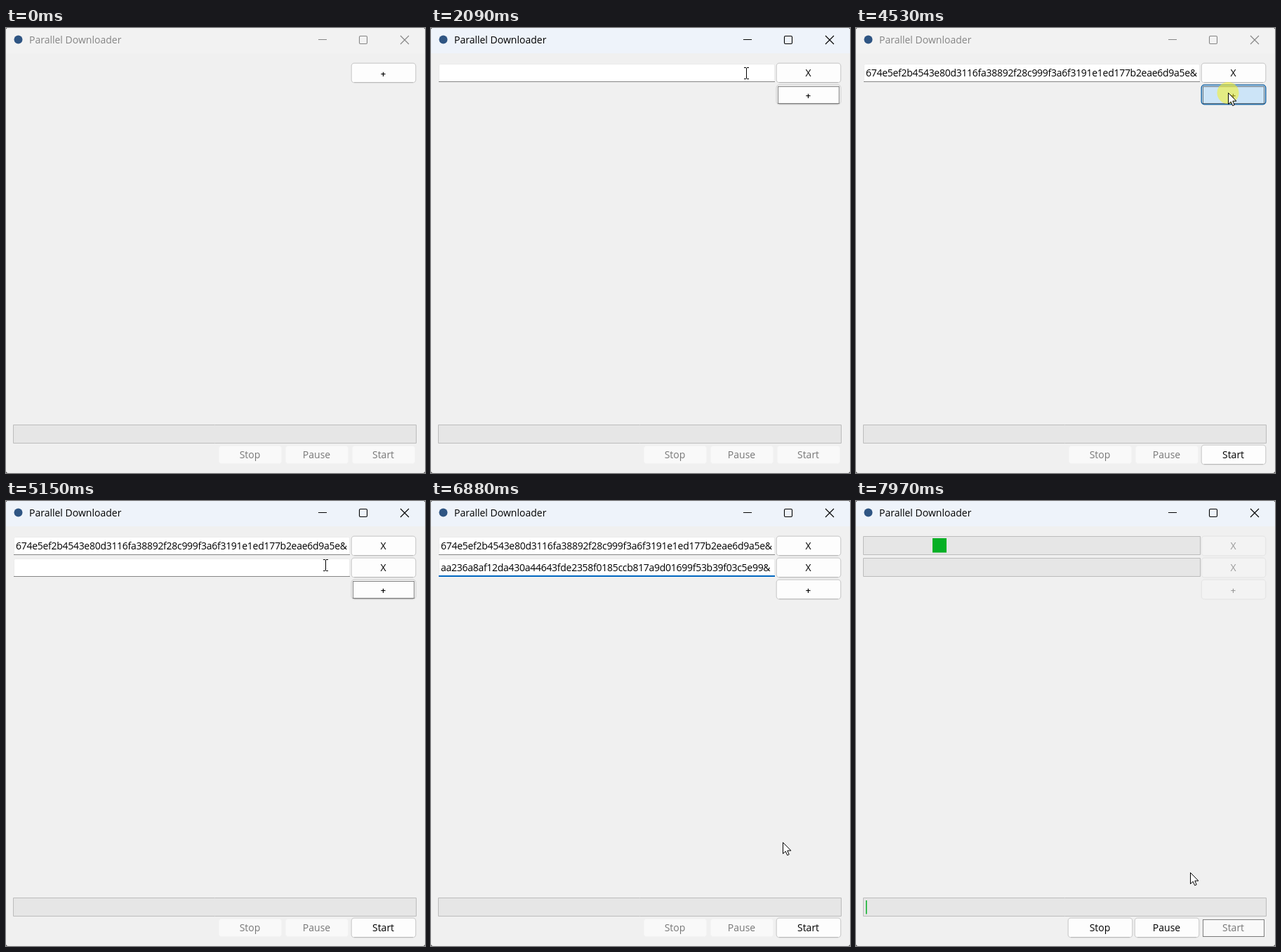
Recreate the animation shown at these times as an HTML page with a canvas. Size 597 by 634 pixels, loop 7990 ms.

```html
<!DOCTYPE html>
<html lang="en">
<head>
<meta charset="utf-8">
<title>Parallel Downloader</title>
<style>
  html, body { margin: 0; width: 100%; height: 100%; overflow: hidden; background: #f0f0f0; }
  canvas { display: block; }
</style>
</head>
<body>
<canvas id="stage" width="597" height="634"></canvas>
<script>
const ctx = document.getElementById('stage').getContext('2d');
const LOOP = 7990;
const FONT = '"Open Sans", "Noto Sans", sans-serif';
const URLS = [
  { text: '674e5ef2b4543e80d3116fa38892f28c999f3a6f3191e1ed177b2eae6d9a5e&', pasted: 2890 },
  { text: 'aa236a8af12da430a44643fde2358f0185ccb817a9d01699f53b39f03c5e99&', pasted: 5880 },
];
const PRESSES = [[1400, 1530], [2210, 2420], [4530, 4660], [5400, 5500], [7430, 7570]];
// Pointer waypoints: time, x, y
const PATH = [
  [0, 600, 78], [570, 600, 78], [1200, 533, 66], [1600, 533, 66], [2090, 449, 64],
  [2900, 449, 64], [3260, 600, 82], [3650, 600, 82], [3680, 595, 83], [4160, 530, 92],
  [4750, 530, 92], [5270, 443, 91], [5870, 443, 91], [6080, 444, 99], [6310, 444, 99],
  [7100, 514, 576], [7300, 521, 598], [7650, 521, 598], [7910, 491, 546],
  [7970, 476, 529], [LOOP, 475, 528],
];
// Keyboard focus changes: time, widget
const FOCUS = [[0, ''], [1400, 'add'], [2210, 'entry0'], [3250, ''],
  [4530, 'add'], [5400, 'entry1'], [7430, 'start']];

const rowTop = i => 50 + 31 * i;

function pointerAt(t) {
  const i = Math.max(1, PATH.findIndex(p => p[0] > t));
  const [t0, x0, y0] = PATH[i - 1], [t1, x1, y1] = PATH[i];
  const u = (t - t0) / (t1 - t0), k = u * u * (3 - 2 * u);
  return { x: Math.round(x0 + (x1 - x0) * k), y: Math.round(y0 + (y1 - y0) * k) };
}

function stateAt(t) {
  return {
    t,
    active: (t >= 1420 && t < 3250) || t >= 4550,
    rows: t < 1560 ? 0 : t < 4690 ? 1 : 2,
    running: t >= 7600,
    focus: FOCUS.findLast(f => f[0] <= t)[1],
    press: PRESSES.find(p => t >= p[0] && t < p[1]),
    pointer: pointerAt(t),
  };
}

function rect(x, y, w, h, fill) {
  ctx.fillStyle = fill;
  ctx.fillRect(x, y, w, h);
}

function label(text, x, y, color, { align = 'left', font = '14px', spacing = 0 } = {}) {
  ctx.font = `${font} ${FONT}`;
  ctx.letterSpacing = spacing + 'px';
  ctx.textAlign = align;
  ctx.fillStyle = color;
  ctx.fillText(text, x, y);
}

function box(x, y, w, h, fill, stroke, radius = 0, lineWidth = 1) {
  ctx.beginPath();
  ctx.roundRect(x + .5, y + .5, w - 1, h - 1, radius);
  ctx.fillStyle = fill;
  ctx.fill();
  ctx.lineWidth = lineWidth;
  ctx.strokeStyle = stroke;
  ctx.stroke();
}

function line(color, width, ...segments) {
  ctx.beginPath();
  for (const [x0, y0, x1, y1] of segments) {
    ctx.moveTo(x0, y0);
    ctx.lineTo(x1, y1);
  }
  ctx.lineWidth = width;
  ctx.strokeStyle = color;
  ctx.stroke();
}

function titleBar(active) {
  const ink = active ? '#000' : '#858585';
  rect(0, 0, 597, 36, active ? '#eef3fa' : '#f2f2f2');
  ctx.beginPath();
  ctx.arc(17.5, 16.5, 6, 0, 7);
  ctx.fillStyle = '#2f5583';
  ctx.fill();
  label('Parallel Downloader', 33, 22, ink);
  line(ink, 1, [445, 16.5, 457, 16.5]);
  line(ink, 1.1, [562, 11, 574, 23], [574, 11, 562, 23]);
  ctx.beginPath();
  ctx.roundRect(503.5, 11.5, 11, 11, 1.5);
  ctx.stroke();
}

function button(s, text, x, y, { enabled = true, focused = false, faint = false } = {}) {
  const w = 92, h = 28, { x: px, y: py } = s.pointer;
  const hover = enabled && px >= x && px < x + w && py >= y && py < y + h;
  const frame = (fill, stroke) => box(x - .3, y - .3, w + .6, h + .6, fill, stroke, 4, 1.3);
  if (!enabled) {
    if (faint) frame('#f3f3f3', '#e6e6e6');
    else box(x + 1, y + 1, w - 2, h - 2, '#f9f9f9', '#f4f4f4', 3);
  } else if (hover) {
    frame(s.press ? '#cce4f7' : '#e0eef9', s.press ? '#005499' : '#0078d4');
  } else {
    frame('#fdfdfd', '#d0d0d0');
    line('#bbb', 1, [x + 4, y + h - .5, x + w - 4, y + h - .5]);
  }
  if (focused) {
    ctx.setLineDash([1, 1]);
    ctx.strokeStyle = '#000';
    ctx.lineWidth = 1;
    ctx.strokeRect(x + 2.5, y + 2.5, w - 5, h - 4);
    ctx.setLineDash([]);
  }
  const ink = enabled ? '#000' : faint ? '#9a9a9a' : '#777';
  const plus = text === '+';
  label(text, x + w / 2 - .5, y + (plus ? 20 : 19), ink,
    { align: 'center', font: plus ? '600 13px' : '14px' });
}

function entry(s, i) {
  const y = rowTop(i) + 1, focused = s.focus === 'entry' + i;
  box(11, y, 479, 26, '#fff', '#ececec', 2);
  if (focused) rect(11, y + 24, 479, 2, '#0067c0');
  else rect(11, y + 25, 479, 1, '#868686');
  if (s.t >= URLS[i].pasted) label(URLS[i].text, 14, y + 18, '#000', { spacing: -.285 });
  else if (focused) rect(14, y + 5, 1, 17, '#000');
}

function progress(y, w) {
  box(10, y, w, 27, '#e6e6e6', '#bcbcbc');
}

function pointer({ pointer: { x, y }, rows, running, press, t }) {
  if (press) {
    const fade = Math.min(1, (t - press[0] + 40) / 60, (press[1] - t) / 40);
    ctx.globalAlpha = .82 * fade;
    ctx.beginPath();
    ctx.arc(x, y + .5, 15.5, 0, 7);
    ctx.fillStyle = '#f6f32a';
    ctx.fill();
    ctx.globalAlpha = 1;
  }
  const overEntry = !running && x < 490 && y >= 51 && y < rowTop(rows) - 3;
  if (overEntry) {
    line('#000', 1, [x + .5, y - 7, x + .5, y + 8],
      [x - 3, y - 7.5, x, y - 7.5], [x + 1, y - 7.5, x + 4, y - 7.5],
      [x - 3, y + 8.5, x, y + 8.5], [x + 1, y + 8.5, x + 4, y + 8.5]);
    return;
  }
  ctx.save();
  ctx.translate(x + .5, y + .5);
  const arrow = new Path2D('M0 0V16L3.7 12.6L6.2 18.2L8.7 17.1L6.3 11.6H11.4Z');
  ctx.fillStyle = '#fff';
  ctx.fill(arrow);
  ctx.lineWidth = 1;
  ctx.strokeStyle = '#000';
  ctx.stroke(arrow);
  ctx.restore();
}

function draw(t) {
  const s = stateAt(t), { rows, running, focus } = s;
  rect(0, 0, 597, 634, '#333');
  ctx.save();
  ctx.beginPath();
  ctx.roundRect(0, 0, 597, 634, 3);
  ctx.clip();
  rect(0, 0, 597, 634, '#f0f0f0');
  titleBar(s.active);

  const locked = { enabled: !running, faint: true };
  for (let i = 0; i < rows; i++) {
    if (running) progress(rowTop(i), 481);
    else entry(s, i);
    button(s, 'X', 492, rowTop(i), locked);
  }
  button(s, '+', 492, rowTop(rows), { ...locked, focused: focus === 'add' });

  progress(565, 575);
  if (running) rect(Math.round(13 + Math.max(0, t - 7640) * .291), 53, 20, 20.5, '#06b025');
  if (t >= 7930) rect(14, 569, 1.5, 19.5, '#06b025');

  button(s, 'Stop', 302, 594, { enabled: running });
  button(s, 'Pause', 397, 594, { enabled: running });
  button(s, 'Start', 492, 594, {
    enabled: !running && t >= URLS[0].pasted,
    focused: focus === 'start',
  });
  pointer(s);
  ctx.restore();
}

function tick() {
  draw(performance.now() % LOOP);
  requestAnimationFrame(tick);
}
tick();
</script>
</body>
</html>
```
